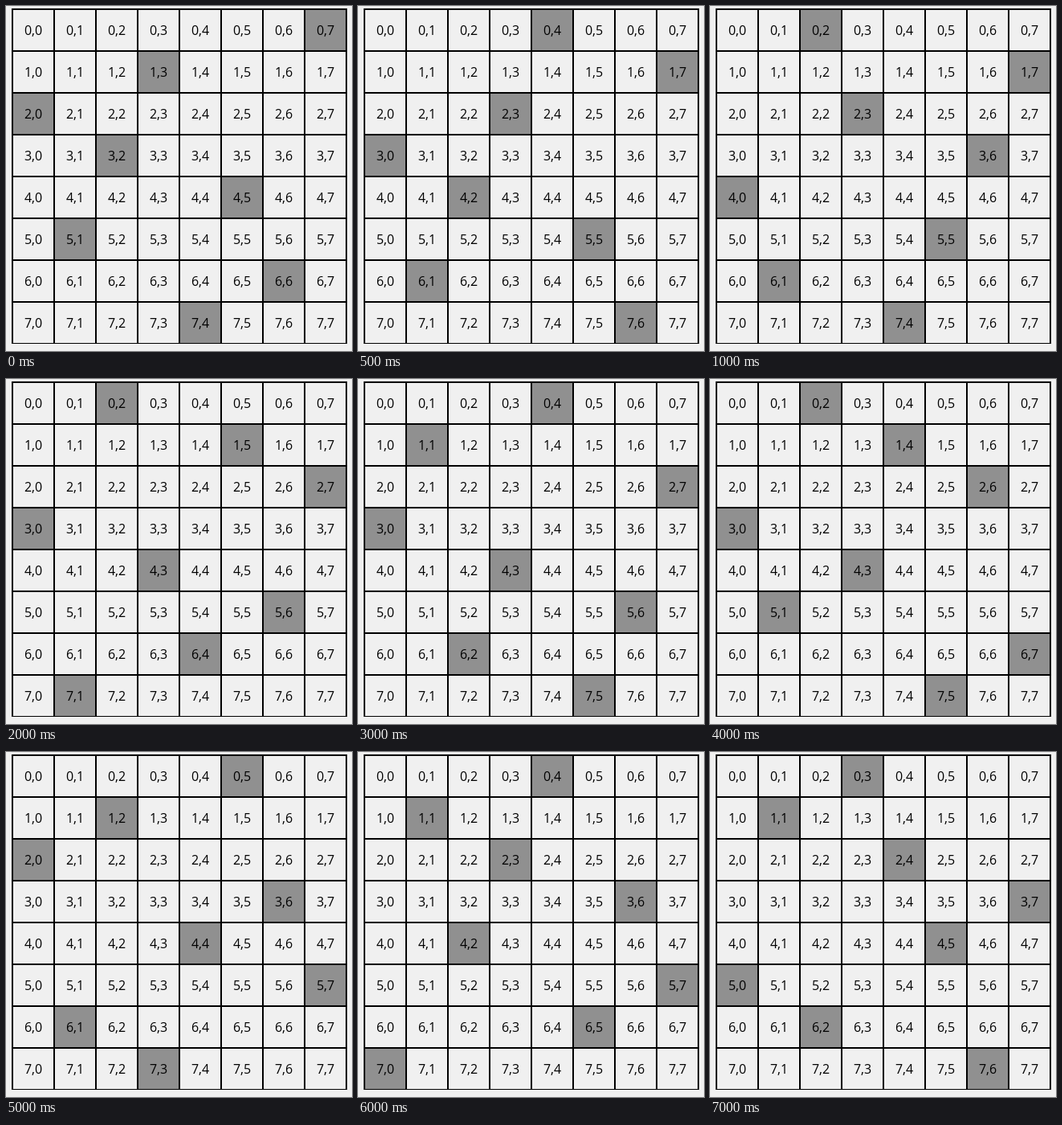
These frames come from a looping animation (431x429 px, 8000 ms). An HTML page with a canvas:

```html
<!DOCTYPE html>
<html lang="en">
<head>
<meta charset="utf-8">
<title>Eight queens</title>
<style>
  html, body { margin: 0; width: 100%; height: 100%; overflow: hidden; background: #f0f0f0; }
  canvas { display: block; }
</style>
</head>
<body>
<canvas id="board" width="431" height="429"></canvas>
<script>
const ctx = document.getElementById('board').getContext('2d');
const SIZE = 8, CELL = 52, LEFT = 8, TOP = 4;
const SPAN = SIZE * CELL;
const LOOP = 8000;

// Start time and the queen's column in each row.
const steps = [
  [0, '73025164'],
  [500, '47302516'],
  [1000, '27360514'],
  [2000, '25703641'],
  [3000, '41703625'],
  [4000, '24603175'],
  [5000, '52064713'],
  [6000, '41362750'],
  [7000, '31475026']
];

function drawGrid() {
  ctx.fillStyle = '#000';
  for (let i = 0; i <= SIZE; i++) {
    const offset = i * CELL - 1;
    ctx.fillRect(LEFT + offset, TOP - 1, 2, SPAN + 1);
    ctx.fillRect(LEFT - 1, TOP + offset, SPAN + 2, i < SIZE ? 2 : 1);
  }
}

function drawBoard(queens) {
  ctx.fillStyle = '#f0f0f0';
  ctx.fillRect(0, 0, 431, 429);
  ctx.font = '16px "Open Sans", "Noto Sans", sans-serif';
  ctx.textAlign = 'center';
  for (let row = 0; row < SIZE; row++) {
    for (let col = 0; col < SIZE; col++) {
      const x = LEFT + col * CELL, y = TOP + row * CELL;
      if (Number(queens[row]) === col) {
        ctx.fillStyle = '#909090';
        ctx.fillRect(x, y, CELL, CELL);
      }
      ctx.fillStyle = '#000';
      ctx.fillText(`${row},${col}`, x + CELL / 2, y + 32);
    }
  }
  drawGrid();
}

function frame() {
  const time = performance.now() % LOOP;
  drawBoard(steps.filter(([start]) => start <= time).pop()[1]);
  requestAnimationFrame(frame);
}
frame();
</script>
</body>
</html>
```
